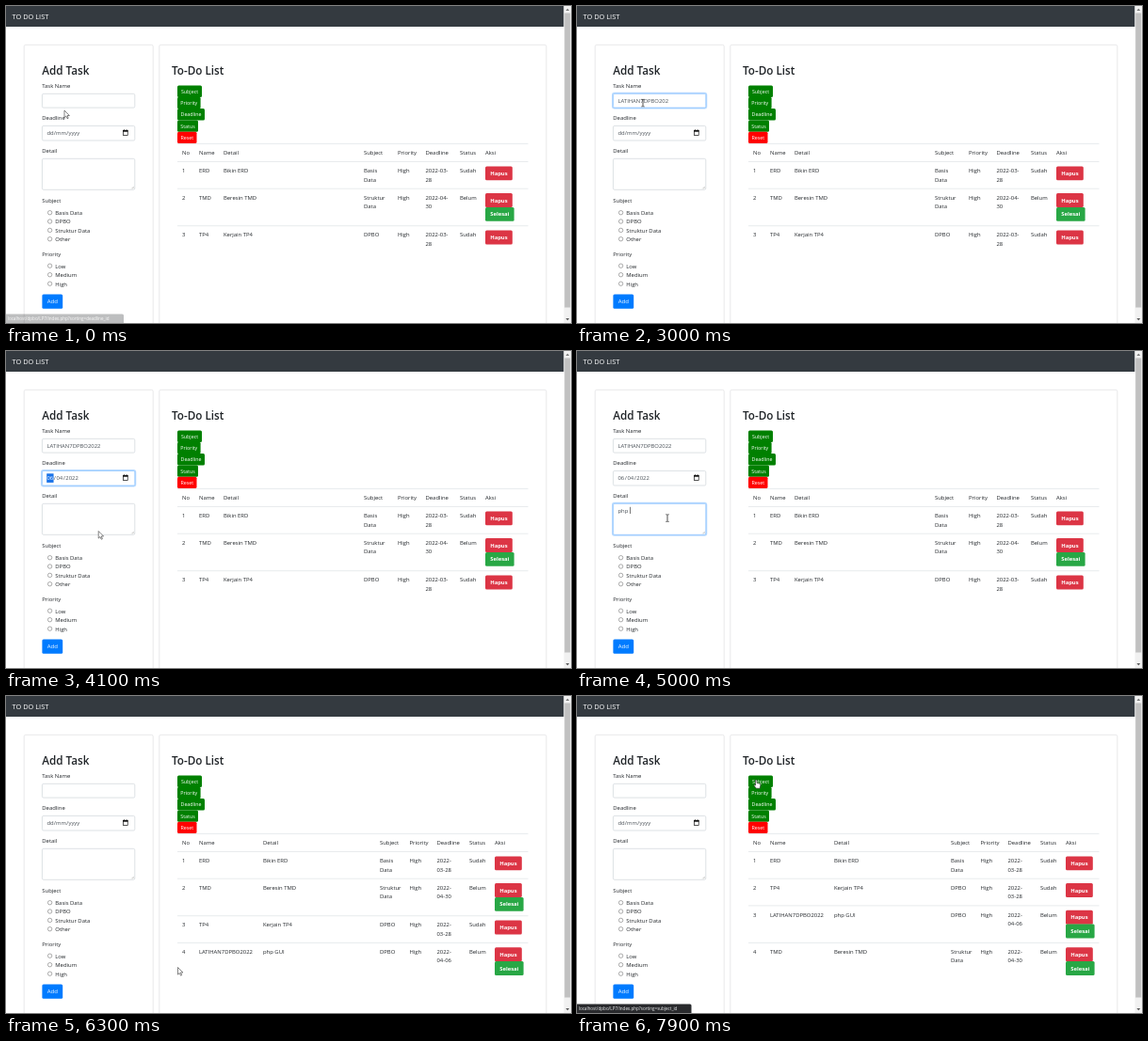
An HTML page that plays this animation: 600 by 337 pixels, repeating every 8000 ms.

```html
<!DOCTYPE html>
<html lang="id">
<head>
<meta charset="utf-8">
<title>To-Do List</title>
<style>
  html, body { margin: 0; width: 100%; height: 100%; overflow: hidden; background: #fff; }
  svg { display: block; width: 600px; height: 337px; }
  text { font-family: "Open Sans", "Noto Sans", sans-serif; white-space: pre; }
</style>
</head>
<body>
<svg viewBox="0 0 600 337"><g id="base"></g><g id="live"></g></svg>
<script>
const LOOP = 8000, STEP = 100;
const INK = '#212529', FIELD_INK = '#495057', BLUE = '#007bff';
const GREEN = '#28a745', RED = '#dc3545';
const BODY = 5.9;

// y is the vertical middle of the capitals
function text(x, y, str, { size = BODY, fill = INK, weight = 400, anchor = 'start' } = {}) {
  return `<text x="${x}" y="${y + size * 0.36}" font-size="${size}" fill="${fill}" ` +
    `font-weight="${weight}" text-anchor="${anchor}">${str}</text>`;
}

function rect(x, y, w, h, fill, extra = '') {
  return `<rect x="${x}" y="${y}" width="${w}" height="${h}" fill="${fill}" ${extra}/>`;
}

function line(d, stroke, width = 0.6) {
  return `<path d="${d}" fill="none" stroke="${stroke}" stroke-width="${width}"/>`;
}

function button(x, y, w, h, color, label, weight = 700, size = 5.85) {
  return rect(x, y, w, h, color, 'rx="1.5"') +
    text(x + w / 2, y + h / 2, label, { size, fill: '#fff', weight, anchor: 'middle' });
}

const measure = document.createElement('canvas').getContext('2d');
function widthOf(str) {
  measure.font = '100px "Open Sans", "Noto Sans", sans-serif';
  return measure.measureText(str).width * BODY / 100;
}

const radios = [
  ['Basis Data', 220], ['DPBO', 229.3], ['Struktur Data', 238.7], ['Other', 248],
  ['Low', 276.5], ['Medium', 286], ['High', 295.5],
];

function drawBase() {
  const card = (x, w) => rect(x, 41.3, w, 310, '#fff', 'rx="1.6" stroke="#e2e2e5" stroke-width=".8"');
  const label = (y, str) => text(38.3, y, str);
  const sorters = [['Subject', 26], ['Priority', 24.6], ['Deadline', 29], ['Status', 22], ['Reset', 20.5]];
  return rect(0, 0, 592.5, 22, '#343a40') +
    text(6.6, 11.2, 'TO DO LIST', { size: 7.4, fill: '#fff' }) +
    rect(592.5, 0, 7.5, 337, '#f1f1f1') +
    rect(593.2, 7.5, 6, 313, '#c1c1c1') +
    '<path d="M594.4 5l1.9-2.2 1.9 2.2z" fill="#777"/>' +
    '<path d="M594.4 332l1.9 2.2 1.9-2.2z" fill="#555"/>' +
    card(19.2, 137) + card(162.8, 411) +
    text(38.2, 69, 'Add Task', { size: 11.7, weight: 600 }) +
    text(176, 69, 'To-Do List', { size: 11.7, weight: 600 }) +
    label(85, 'Task Name') + label(119.3, 'Deadline') + label(154, 'Detail') +
    label(207.3, 'Subject') + label(264, 'Priority') +
    radios.map(([name, y]) => text(52.3, y, name)).join('') +
    sorters.map(([name, w], i) =>
      button(182, 84.5 + i * 12.3, w, 12.4, name === 'Reset' ? '#f00' : 'green', name, 400, 5.3)).join('');
}

const narrow = [187, 205, 231, 380, 416, 445.5, 482, 509];
const wide = [187, 205, 273, 397, 428.5, 457.5, 492, 519];
const tasks = {
  erd: ['ERD', 'Bikin ERD', 'Basis Data', '2022-03-28', true],
  tmd: ['TMD', 'Beresin TMD', 'Struktur Data', '2022-04-30', false],
  tp4: ['TP4', 'Kerjain TP4', 'DPBO', '2022-03-28', true],
  gui: ['LATIHAN7DPBO2022', 'php GUI', 'DPBO', '2022-04-06', false],
};

function drawTable(keys, cols) {
  const rule = y => line(`M182 ${y}H554.5`, '#dee2e6', 0.7);
  const dateCut = cols === wide ? 5 : 8;
  const heads = ['No', 'Name', 'Detail', 'Subject', 'Priority', 'Deadline', 'Status', 'Aksi'];
  let out = rule(146.4) + heads.map((h, i) => text(cols[i], 156, h)).join('');
  let y = 165.5;
  keys.forEach((key, i) => {
    const [name, detail, subject, date, done] = tasks[key];
    const cells = [[i + 1], [name], [detail], subject.split(' '), ['High'],
      [date.slice(0, dateCut), date.slice(dateCut)], [done ? 'Sudah' : 'Belum']];
    out += rule(y);
    cells.forEach((lines, c) => lines.forEach((str, n) => {
      out += text(cols[c], y + 9.5 + n * 9.4, str);
    }));
    out += button(cols[7], y + 4.9, 28.8, 14.9, RED, 'Hapus');
    if (!done) out += button(cols[7], y + 19.7, 30.6, 14.9, GREEN, 'Selesai');
    y += done ? 28.7 : 39.5;
  });
  return out;
}

// focus: 0 to 1
function field(y, h, focus) {
  const ring = focus ? rect(37.7, y - 0.7, 99.8, h + 1.4, 'none',
    `rx="2" stroke="${BLUE}" stroke-opacity="${0.28 * focus}" stroke-width="1.5"`) : '';
  return ring + rect(38.4, y, 98.4, h, '#fff',
    `rx="1.5" stroke="${focus ? '#80bdff' : '#ced4da'}" stroke-width=".7"`);
}

function typed(str, y, caretOn) {
  const caret = caretOn ? rect(43.7 + widthOf(str), y - 3.6, 0.6, 7.2, '#222') : '';
  return text(43.5, y, str, { fill: FIELD_INK }) + caret;
}

function drawDate(filled, daySelected) {
  const parts = filled ? ['06', '/', '04', '/', '2022'] : ['dd', '/', 'mm', '/', 'yyyy'];
  let x = 43.5, out = '';
  parts.forEach((part, i) => {
    const w = widthOf(part), lit = daySelected && i === 0;
    if (lit) out += rect(x - 0.3, 130.3, w + 0.6, 9.6, '#1a73e8');
    out += text(x, 135, part, { fill: lit ? '#fff' : FIELD_INK });
    x += w + (filled ? 0.5 : 0.1);
  });
  return out + rect(124.4, 132.3, 4.8, 5.2, 'none', 'stroke="#111" stroke-width=".7"') +
    rect(124.2, 132, 5.2, 1.7, '#111') + line('M125.5 131.2v1.2M128.1 131.2v1.2', '#111', 0.7);
}

function drawCalendar(pressed) {
  const blue = '#1a73e8';
  let out = '';
  for (let i = 4; i > 0; i--) {
    out += rect(38.5 - i * 0.9, 144.5 - i * 0.4, 85.5 + i * 1.8, 109.3 + i * 1.4, '#000', 'rx="2.5" opacity=".055"');
  }
  out += rect(38.5, 144, 85.5, 109.8, '#fff', 'rx="1.5" stroke="#c8c8c8" stroke-width=".5"') +
    text(42.8, 152.7, 'April 2022', { size: 4.8, weight: 700 }) +
    '<path d="M67.2 152h2.8l-1.4 1.8z" fill="#222"/>' +
    line('M102 155.8v-6M99.6 152.2l2.4-2.5 2.4 2.5M114.5 149.6v6M112.1 153.2l2.4 2.5 2.4-2.5', '#333', 0.7);
  const colX = c => 47.7 + c * 11.25;
  ['Su', 'Mo', 'Tu', 'We', 'Th', 'Fr', 'Sa'].forEach((d, c) => {
    out += text(colX(c), 166.4, d, { size: 4.7, weight: 600, anchor: 'middle' });
  });
  out += rect(75.9, 183.2, 11.2, 11, '#0075ff', 'rx=".6"');
  for (let i = 0; i < 42; i++) {
    const day = i - 4, inMonth = day > 0 && day <= 30;
    const shown = day <= 0 ? day + 31 : inMonth ? day : day - 30;
    const fill = day === 6 ? '#fff' : inMonth ? INK : '#8a8d91';
    out += text(colX(i % 7), 177.7 + Math.floor(i / 7) * 11.2, shown,
      { size: 4.7, fill, weight: day === 6 ? 700 : 400, anchor: 'middle' });
  }
  if (pressed) out += rect(102.3, 241, 14.4, 8.2, '#a5cbf8', 'rx=".6"');
  return out + text(47, 245.4, 'Clear', { size: 4.8, fill: blue }) +
    text(109.4, 245.4, 'Today', { size: 4.8, fill: blue, anchor: 'middle' });
}

function drawStatus(page, opacity) {
  const url = `localhost/dpbo/LP7/index.php?sorting=${page}_id`;
  return `<g opacity="${opacity}">` + rect(-2, 327.6, page === 'subject' ? 123.5 : 127, 12, '#292a2d', 'rx="1.5"') +
    text(1.8, 332.4, url, { size: 4.55, fill: '#f1f3f4' }) + '</g>';
}

const pointers = {
  arrow: '<path d="M0 0v7.6l1.8-1.6 1.2 2.7 1.2-.5-1.2-2.7h2.4z" fill="#fff" stroke="#333" stroke-width=".6"/>',
  beam: line('M-1.6-3.7h1.1l.5.5.5-.5h1.1M0-3.2v6.6M-1.6 3.9h1.1l.5-.5.5.5h1.1', '#222', 0.8),
  hand: '<path d="M0 .6q.8-1.2 1.5 0v2.8l3.2.8q.9.4.7 1.4l-.6 3.6h-4l-2.6-3.4q.3-1 1.8.2z" fill="#fff" stroke="#222" stroke-width=".6"/>',
};

// time, x, y, shape from that moment on
const path = [
  [0, 62, 111, 'arrow'], [200, 62, 111, 'arrow'], [500, 70, 103, 'beam'], [3100, 70, 103, 'beam'],
  [3200, 92, 116, 'arrow'], [3400, 127, 135, 'arrow'], [3700, 104.5, 231.5, 'arrow'], [3900, 104.5, 231.5, 'arrow'],
  [4200, 96, 177.5, 'beam'], [5200, 96, 177.5, 'beam'], [5300, 70, 205, 'arrow'], [5400, 47, 229, 'arrow'],
  [5500, 47, 229, 'arrow'], [5700, 47, 295, 'arrow'], [5800, 47, 295, 'arrow'], [5900, 50, 314, 'hand'],
  [6000, 50, 314, 'hand'], [6100, 90, 310, 'arrow'], [6300, 182.5, 288.5, 'arrow'], [6900, 182.5, 288.5, 'arrow'],
  [7200, 189, 190, 'arrow'], [7500, 189.5, 89, 'hand'], [8000, 189.5, 89, 'hand'],
];

function drawPointer(t) {
  const i = Math.max(0, path.findIndex(p => p[0] > t) - 1);
  const [t0, x0, y0, shape] = path[i], [t1, x1, y1] = path[i + 1];
  const k = (t - t0) / (t1 - t0), e = k * k * (3 - 2 * k);
  return `<g transform="translate(${x0 + (x1 - x0) * e} ${y0 + (y1 - y0) * e})">${pointers[shape]}</g>`;
}

const between = (t, a, b) => t >= a && t < b;
const keysTyped = (t, start, delay) => Math.max(0, Math.floor((t - start) / delay) + 1);
const blink = (t, start) => (t - start + 1060) % 1060 < 530;

function drawLive(t) {
  const sent = t >= 6100, sorted = t >= 7800;
  const keys = sorted ? ['erd', 'tp4', 'gui', 'tmd'] : ['erd', 'tmd', 'tp4'].concat(sent ? 'gui' : []);
  const nameFocus = between(t, 600, 3300) ? (t === 600 ? 0.5 : 1) : 0;
  const dateFocus = between(t, 3300, 4300) ? 1 : 0;
  const detailFocus = between(t, 4300, 5400) ? 1 : 0;
  const name = sent ? '' : 'LATIHAN7DPBO2022'.slice(0, keysTyped(t, 1000, 138));
  const detail = sent ? '' : 'php GUI'.slice(0, keysTyped(t, 4600, 120));
  const chosen = { DPBO: between(t, 5400, 6100), High: between(t, 5800, 6100) };

  let out = field(93.3, 14.8, nameFocus) + typed(name, 100.6, nameFocus && blink(t, 1000)) +
    field(127.4, 15.6, dateFocus) + drawDate(between(t, 3700, 6100), dateFocus) +
    field(162.3, 33, detailFocus) + typed(detail, 169.4, detailFocus && blink(t, 4600)) +
    line('M133.4 194.3l2.4-2.4M134.9 194.3l.9-.9', '#777', 0.4);
  radios.forEach(([label, y]) => {
    const on = chosen[label];
    out += `<circle cx="46.6" cy="${y - 0.3}" r="2.2" fill="#fff" stroke="${on ? '#0075ff' : '#767676'}" stroke-width=".6"/>`;
    if (on) out += `<circle cx="46.6" cy="${y - 0.3}" r="1.3" fill="#0075ff"/>`;
  });
  if (t === 6000) out += rect(37.7, 305.7, 23.2, 16.9, '#99caff', 'rx="2"');
  out += button(38.4, 306.5, 21.8, 15.2, between(t, 5900, 6100) ? '#0069d9' : BLUE, 'Add', 400, 6);
  out += drawTable(keys, sent ? wide : narrow);
  if (between(t, 3500, 3900)) out += drawCalendar(t >= 3700);
  if (t < 200) out += drawStatus('deadline', t ? 0.12 : 0.3);
  if (t >= 7500) out += drawStatus('subject', t === 7500 ? 0.5 : 1);
  return out + drawPointer(t);
}

const live = document.getElementById('live');
document.getElementById('base').innerHTML = drawBase();
let start = null, shown = -1;
function tick(now) {
  if (start === null) start = now;
  const t = Math.floor((now - start) % LOOP / STEP) * STEP;
  if (t !== shown) {
    live.innerHTML = drawLive(t);
    shown = t;
  }
  requestAnimationFrame(tick);
}
live.innerHTML = drawLive(0);
requestAnimationFrame(tick);
</script>
</body>
</html>
```
